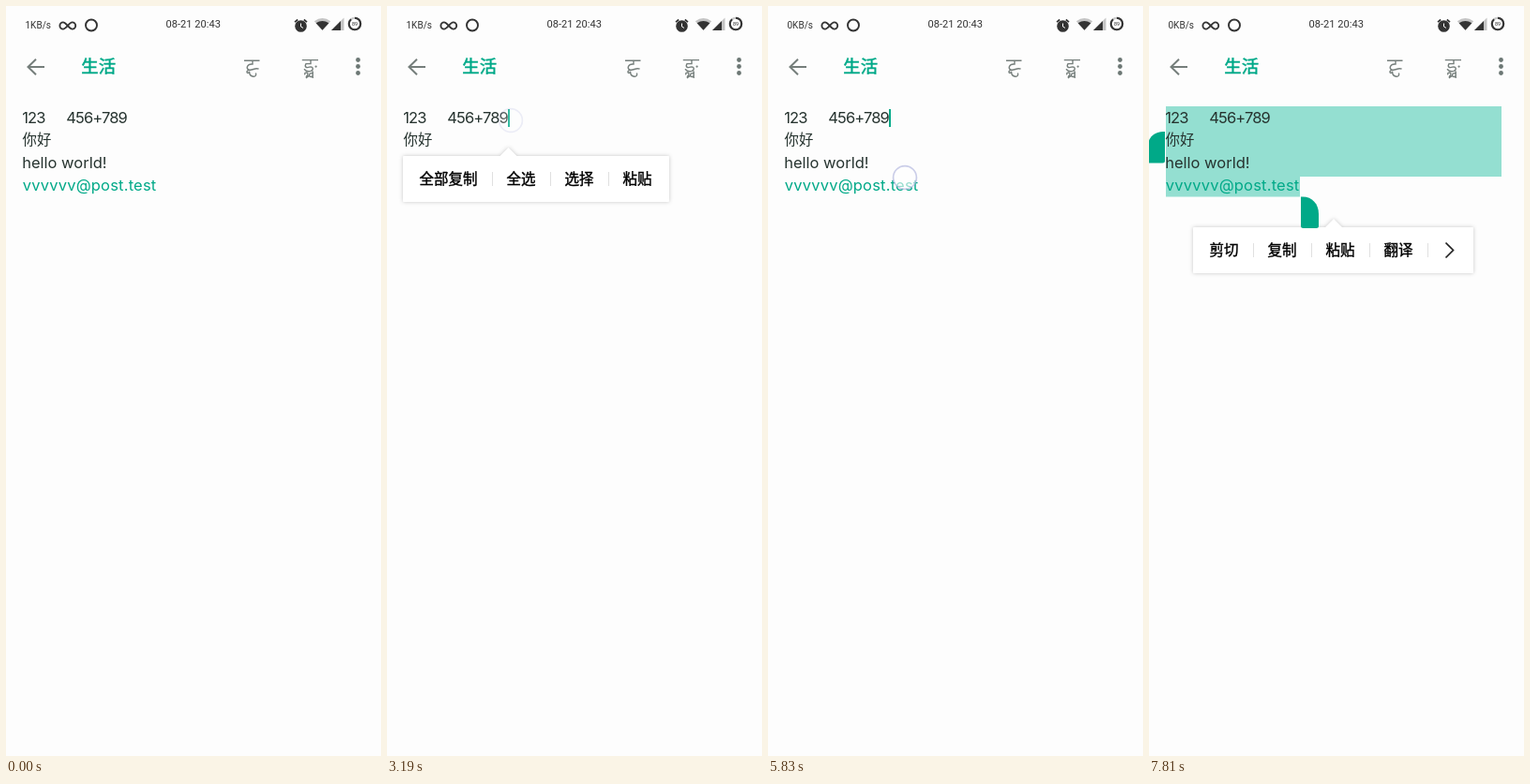
An HTML page that plays this animation: 400x800 px, repeating every 8 s.

```html
<!DOCTYPE html>
<html lang="zh-CN">
<head>
<meta charset="utf-8">
<title>Note text selection</title>
<style>
  html, body { margin: 0; width: 100%; height: 100%; overflow: hidden; background: #fdfdfd; }
  svg { display: block; width: 400px; height: 800px; }
  .bar { font-family: Roboto, "Noto Sans", sans-serif; fill: #333; }
  .note { font: 16.5px Inter, "Noto Sans", sans-serif; font-feature-settings: "cv11"; fill: #26332f; }
  .digits { letter-spacing: -.9px; }
  .mail { letter-spacing: .2px; }
  .cjk { font-family: "Noto Sans CJK SC", "Noto Sans CJK", sans-serif; }
  .hello { font-size: 15.4px; }
  .teal { fill: #00a988; }
  .title { font-size: 18.4px; stroke: #00a988; stroke-width: .5; }
  .menu { font-size: 15.5px; fill: #000; stroke: #000; stroke-width: .4; }
  .bubble { fill: #fff; filter: drop-shadow(0 0 2px rgba(0, 0, 0, .22)); }
  .rule { stroke: #e0e0e0; }
  .line { fill: none; stroke: #757e7b; }
</style>
</head>
<body>
<svg viewBox="0 0 400 800">
  <rect width="400" height="800" fill="#fdfdfd"/>

  <!-- status bar -->
  <g class="bar">
    <text id="speed" x="20.5" y="24" font-size="10">1KB/s</text>
    <text x="170.5" y="23" font-size="11.1">08-21 20:43</text>
    <path d="M65.8 21C63.5 18.6 62.5 17.4 61 17.4a3.6 3.6 0 0 0 0 7.2C63.8 24.6 67.6 17.4 70.6 17.4a3.6 3.6 0 0 1 0 7.2C69.1 24.6 68.1 23.4 65.8 21Z" fill="none" stroke="#333" stroke-width="1.9"/>
    <circle cx="91" cy="20.5" r="6" fill="none" stroke="#333" stroke-width="1.9"/>
    <circle cx="314.5" cy="21.5" r="6.3"/>
    <path d="M308 17.2l3.2-2.7M321 17.2l-3.2-2.7" stroke="#333" stroke-width="1.7"/>
    <path d="M314.5 18.5v3.5l2.4 1.4" fill="none" stroke="#fff" stroke-width="1"/>
    <path d="M328.8 16.2Q337.5 9.8 346.2 16.2L337.5 25.8Z" fill="#c4c4c4"/>
    <path d="M330.6 18.2Q337.5 14 344.4 18.2L337.5 25.8Z"/>
    <path d="M347 26L360.5 12.5V26Z" fill="#c4c4c4"/>
    <path d="M347 26L357 16V26Z"/>
    <circle cx="372" cy="19" r="6.2" fill="none" stroke="#c8c8c8" stroke-width="2.1"/>
    <circle cx="372" cy="19" r="6.2" fill="none" stroke="#333" stroke-width="2.1" pathLength="100" stroke-dasharray="89 11" transform="rotate(-90 372 19)"/>
    <text x="372" y="21" font-size="5.4" text-anchor="middle">89</text>
  </g>

  <!-- toolbar -->
  <path class="line" d="M41 65H23.5M32 56.8L23.5 65L32 73.2" stroke-width="2"/>
  <text class="cjk teal title" x="80.3" y="71.3">生活</text>
  <g class="line" stroke-width="1.4">
    <path d="M254 58.2H270.5M263 58.2V62C257 61.5 255.4 67 259.4 68.2C263 69 265.6 65.4 269.6 67.2M259.4 68.2C255.4 69.6 257 73 259.6 70.6C260 76.4 268.4 76.8 266.4 71.4"/>
    <path d="M315.8 57.6H333M325 57.6V61.6H320C318 65 320.4 66.3 323.6 65.2C327.8 64 328.4 68.4 325 69.4C322 70.2 319.4 69 318 67.2M319 73.4C317.6 70.6 321.6 70.4 322 72.4C322.2 74.4 319.4 74.8 320.4 76.4L323.6 74.2M327.2 69.4V77M327.2 72.2C324.6 70.6 322.6 73 324 75C325 76 326.6 75.6 327.2 74.4"/>
  </g>
  <circle cx="330.6" cy="64.6" r="1.1" fill="#757e7b"/>
  <g fill="#6c7774">
    <circle cx="375.5" cy="57.5" r="2.4"/><circle cx="375.5" cy="64.5" r="2.4"/><circle cx="375.5" cy="71.5" r="2.4"/>
  </g>

  <!-- note -->
  <path id="selection" d="M18 107H376V182H161V203.5H18Z" fill="#94dfd1"/>
  <g class="note">
    <text class="digits" x="17.2" y="124.6">123</text>
    <text class="digits" x="64.3" y="124.6">456+789</text>
    <text class="cjk hello" x="17.5" y="148.3">你好</text>
    <text x="17.2" y="173">hello world!</text>
    <text class="teal mail" x="17.8" y="197">vvvvvv@post.test</text>
  </g>
  <rect id="cursor" class="teal" x="129" y="110" width="2" height="19"/>
  <circle id="drop" class="teal" cx="130" cy="143" r="9.8"/>
  <g id="pasteMenu"></g>
  <g id="editMenu"></g>
  <g id="handles" class="teal">
    <path id="grip" d="M162 203.5h2C174 203.5 181 211 181 222V234.5q0 2.5-2.5 2.5H164.5q-2.5 0-2.5-2.5Z"/>
    <use href="#grip" transform="translate(179 -69.5) scale(-1 1)"/>
  </g>
  <circle id="touch" r="12.4" fill="#fff" fill-opacity=".6" stroke="#a9aeda" stroke-opacity=".6" stroke-width="1.7"/>
</svg>
<script>
const LOOP = 8000, STEP = 110;
const $ = id => document.getElementById(id);

// Each track lists [start in ms, value]; values hold until the next entry.
const opacity = {
  touch: [[0, 0], [1540, 1], [2970, .8], [3080, .6], [3190, .35], [3300, .15], [3410, 0],
          [5720, 1], [6050, .6], [6160, .25], [6270, 0]],
  drop: [[0, 0], [2640, 1], [2970, 0]],
  cursor: [[0, 0], [2750, 1], [3850, 0], [4950, 1], [5940, 0]],
  pasteMenu: [[0, 0], [2970, .3], [3080, .75], [3190, 1], [5830, 0]],
  selection: [[0, 0], [5940, 1]],
  handles: [[0, 0], [6050, 1]],
  editMenu: [[0, 0], [6160, .3], [6270, .75], [6380, 1]]
};
const speed = [[0, "1KB/s"], [4180, "0KB/s"]];
const touchSpot = [[0, [132, 122]], [5720, [146, 183]]];

function valueAt(track, t) {
  let value = track[0][1];
  for (const [start, v] of track) if (t >= start) value = v;
  return value;
}

function buildMenu(id, x, y, width, tip, labels, more) {
  const bottom = y + 49;
  let out = `<path class="bubble" d="M${x + 1} ${y}H${tip - 9}L${tip} ${y - 9}L${tip + 9} ${y}H${x + width - 1}q1 0 1 1V${bottom - 1}q0 1-1 1H${x + 1}q-1 0-1-1V${y + 1}q0-1 1-1Z"/>`;
  let left = x + 17.5;
  labels.forEach((label, i) => {
    out += `<text class="cjk menu" x="${left}" y="${y + 30.3}">${label}</text>`;
    left += label.length * 15.5 + 31;
    if (more || i < labels.length - 1)
      out += `<path class="rule" d="M${Math.floor(left - 15.5) + .5} ${y + 17}v15"/>`;
  });
  if (more)
    out += `<path d="M${left + 4} ${y + 16.5}l8 8l-8 8" fill="none" stroke="#222" stroke-width="1.7"/>`;
  $(id).innerHTML = out;
}

buildMenu("pasteMenu", 17, 160, 284, 129.5, ["全部复制", "全选", "选择", "粘贴"], false);
buildMenu("editMenu", 47, 236, 299, 197, ["剪切", "复制", "粘贴", "翻译"], true);

function draw(t) {
  // Half a millisecond guards the step edges against rounding.
  const tick = Math.floor((t + .5) / STEP) * STEP;
  for (const id in opacity) $(id).setAttribute("opacity", valueAt(opacity[id], tick));
  const [x, y] = valueAt(touchSpot, tick);
  $("touch").setAttribute("cx", x);
  $("touch").setAttribute("cy", y);
  $("speed").textContent = valueAt(speed, tick);
}

const begin = performance.now();
function loop() {
  draw((performance.now() - begin) % LOOP);
  requestAnimationFrame(loop);
}
loop();
</script>
</body>
</html>
```
